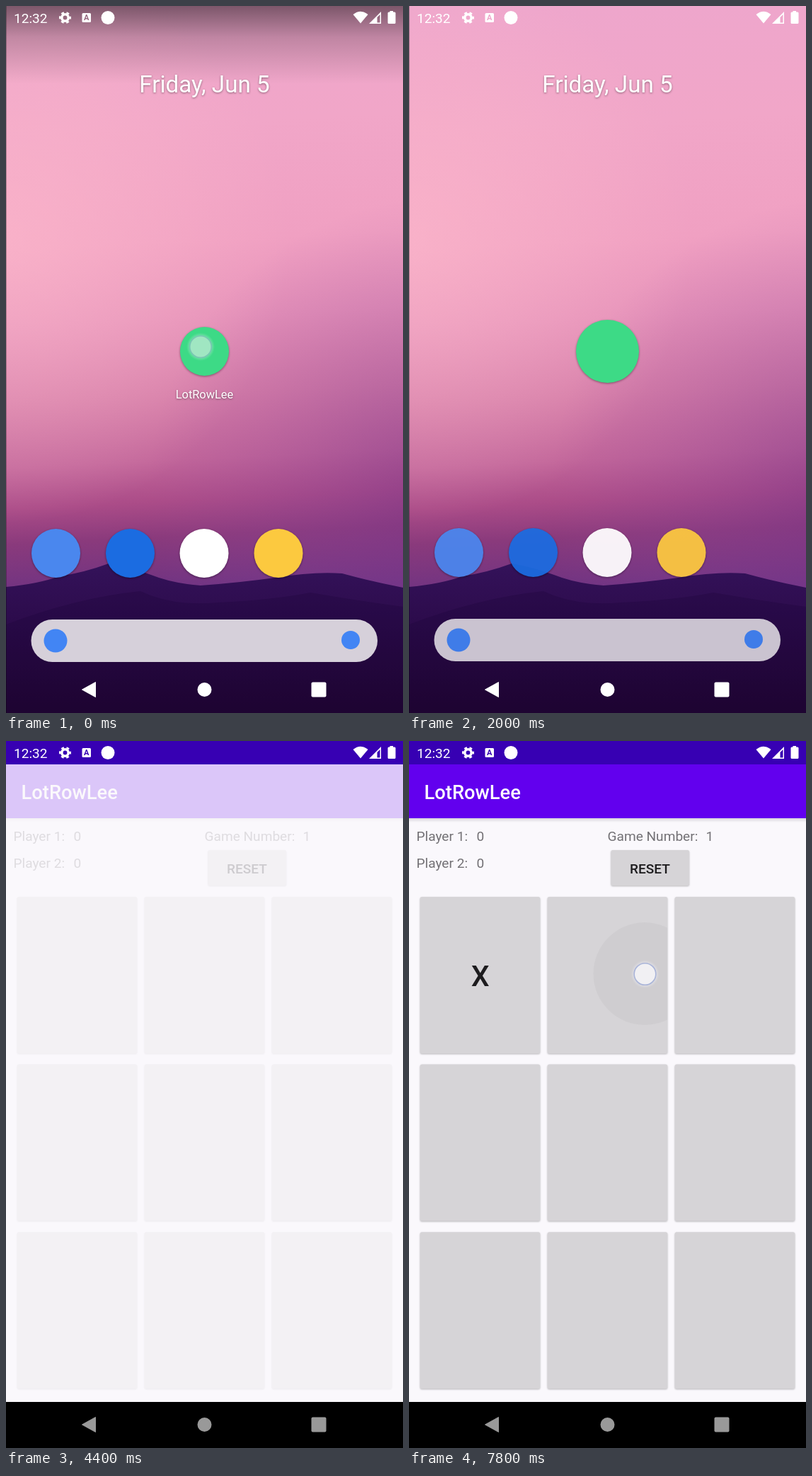
These frames come from a looping animation (561 px wide and 998 px high, 8 s). An HTML page:

```html
<!DOCTYPE html>
<html lang="en">
<head>
<meta charset="utf-8">
<title>Grid game launch</title>
<style>
  html, body { margin: 0; width: 100%; height: 100%; overflow: hidden; }
  svg { display: block; width: 561px; height: 998px; font-family: Roboto, sans-serif; font-size: 19.1px; }
  .shade { filter: drop-shadow(0 1px 1.5px #0006); }
  .cell { fill: #d6d4d7; filter: drop-shadow(0 1.2px 1.2px #0004); }
  .medium { font-weight: 500; }
</style>
</head>
<body>
<svg viewBox="0 0 561 998">
  <defs>
    <linearGradient id="sky" gradientUnits="userSpaceOnUse" x1="240" y1="0" x2="280" y2="830">
      <stop offset="0" stop-color="#eea6cc"/>
      <stop offset=".2" stop-color="#f1a6c8"/>
      <stop offset=".4" stop-color="#f0a0c2"/>
      <stop offset=".53" stop-color="#e591b9"/>
      <stop offset=".66" stop-color="#d57da8"/>
      <stop offset=".77" stop-color="#c2669a"/>
      <stop offset=".84" stop-color="#ab4c88"/>
      <stop offset=".9" stop-color="#8a3a7c"/>
      <stop offset="1" stop-color="#6b3283"/>
    </linearGradient>
    <radialGradient id="glow" gradientUnits="userSpaceOnUse" cx="0" cy="330" r="400">
      <stop offset="0" stop-color="#fcb8cb" stop-opacity=".7"/>
      <stop offset="1" stop-color="#fcb8cb" stop-opacity="0"/>
    </radialGradient>
    <radialGradient id="dusk" gradientUnits="userSpaceOnUse" cx="620" cy="690" r="420">
      <stop offset="0" stop-color="#7a3488" stop-opacity=".55"/>
      <stop offset="1" stop-color="#9c50a0" stop-opacity="0"/>
    </radialGradient>
    <linearGradient id="land" x2="0" y2="1">
      <stop offset="0" stop-color="#34125a"/>
      <stop offset=".4" stop-color="#2c0b4b"/>
      <stop offset="1" stop-color="#1f042e"/>
    </linearGradient>
    <linearGradient id="scrimFill" x2="0" y2="1">
      <stop offset="0" stop-opacity=".48"/>
      <stop offset=".4" stop-opacity=".2"/>
      <stop offset="1" stop-opacity="0"/>
    </linearGradient>
    <linearGradient id="barShadow" x2="0" y2="1">
      <stop offset="0" stop-opacity=".13"/>
      <stop offset="1" stop-opacity="0"/>
    </linearGradient>
    <radialGradient id="halo">
      <stop offset=".7" stop-color="#e9e9f2" stop-opacity=".7"/>
      <stop offset="1" stop-color="#e9e9f2" stop-opacity="0"/>
    </radialGradient>
    <clipPath id="cellClip"><rect id="clipRect" y="220" width="169.5" height="221" rx="2.5"/></clipPath>
  </defs>

  <g id="home">
    <path fill="url(#sky)" d="M0 0H561V998H0z"/>
    <path fill="url(#glow)" d="M0 0H561V830H0z"/>
    <path fill="url(#dusk)" d="M0 0H561V830H0z"/>
    <path fill="url(#land)" d="M0 820Q45 816 75 805Q110 800 145 787Q175 792 205 803Q235 815 275 818Q330 814 380 807Q435 798 475 801Q515 812 561 821V998H0z"/>
    <path fill="#1d0638" opacity=".3" d="M0 873Q100 835 190 826Q235 848 300 842Q380 838 430 828Q500 840 561 848V998H0z"/>
    <rect id="scrim" width="561" height="110" fill="url(#scrimFill)"/>
    <path fill="#0004" d="M0 0h1v998h-1z"/>
    <text class="shade" x="280.5" y="122" font-size="33.2" text-anchor="middle" fill="#fff">Friday, Jun 5</text>
    <text id="label" class="shade" x="280.5" y="554" font-size="16.4" text-anchor="middle" fill="#fff">LotRowLee</text>
    <g id="dock">
      <g class="shade">
        <circle cx="70.5" cy="772.5" r="34.5" fill="#4a87ee"/>
        <circle cx="175.5" cy="772.5" r="34.5" fill="#1b6ce1"/>
        <circle cx="280" cy="772.5" r="34.5" fill="#fff"/>
        <circle cx="385" cy="772.5" r="34.5" fill="#fcc93f"/>
      </g>
      <rect x="35.5" y="866" width="489.5" height="60" rx="30" fill="#d6d0da"/>
      <circle cx="70" cy="896" r="16.5" fill="#4285f4"/>
      <circle cx="487" cy="895" r="13" fill="#4285f4"/>
    </g>
    <circle id="icon" class="shade" cx="280.5" cy="487.5" fill="#3dda86"/>
  </g>

  <g id="app">
    <path fill="#faf8fc" d="M0 0H561V998H0z"/>
    <path fill="#3700b3" d="M0 0H561V33H0z"/>
    <path d="M0 933H561V998H0z"/>
    <g id="content">
      <path fill="#6200ee" d="M0 33H561V109H0z"/>
      <path fill="url(#barShadow)" d="M0 109H561V115H0z"/>
      <text class="medium" x="21.5" y="81.5" font-size="27.3" fill="#fff">LotRowLee</text>
      <g fill="#737175">
        <text x="10.5" y="141">Player 1:</text><text x="95.5" y="141">0</text>
        <text x="10.5" y="178.5">Player 2:</text><text x="95.5" y="178.5">0</text>
        <text x="280.5" y="141">Game Number:</text><text x="419.5" y="141">1</text>
      </g>
      <rect class="cell" x="285.5" y="154" width="110.5" height="50" rx="2.5"/>
      <text class="medium" x="340.5" y="187" text-anchor="middle" fill="#1d1c1e">RESET</text>
      <g id="board"></g>
      <circle id="ripple" clip-path="url(#cellClip)"/>
      <text id="mark" class="medium" x="100.7" y="346" font-size="41" text-anchor="middle" fill="#1d1c1e">X</text>
    </g>
  </g>

  <g fill="#fff">
    <text x="11" y="24">12:32</text>
    <circle cx="83.5" cy="16.5" r="4.7" fill="none" stroke="#fff" stroke-width="3.6"/>
    <circle cx="83.5" cy="16.5" r="7.2" fill="none" stroke="#fff" stroke-width="2.6" stroke-dasharray="3.9 3.64" stroke-dashoffset="1.95"/>
    <path fill-rule="evenodd" d="M109 10h9.500q1.500 0 1.500 1.500v10q0 1.500-1.500 1.500h-9.500q-1.500 0-1.500-1.500v-10q0-1.500 1.500-1.500zM113 12l-3 8h1.700l.5-1.500h3l.5 1.500h1.700l-3-8zM113.700 14l1 3h-2z"/>
    <circle cx="144" cy="16.500" r="9.500"/>
    <path d="M490.500 12Q501 3.500 511.500 12L501 24.500z"/>
    <path d="M513 25L530 8V25zM524.500 23.500H528.500V12L524.500 16z" fill-rule="evenodd"/>
    <path d="M542.500 7h4.500v1.500h2q1.500 0 1.500 1.500v13.500q0 1.500-1.500 1.500h-8q-1.500 0-1.500-1.500v-13.500q0-1.500 1.500-1.500h1.500z"/>
  </g>
  <g id="nav" fill="#fff">
    <path d="M107.500 965L126.500 954.500V975.500z" stroke="#fff" stroke-linejoin="round"/>
    <circle cx="280.500" cy="965" r="10"/>
    <rect x="431.500" y="954.500" width="21" height="21" rx="2"/>
  </g>
  <g id="touch">
    <circle r="20" fill="url(#halo)"/>
    <circle r="15.300" fill="#f1f0f3" stroke="#a9b4d8" stroke-width="1.600"/>
  </g>
</svg>
<script>
const LOOP = 8000, STEP = 200;
const el = id => document.getElementById(id);
const set = (id, attrs) => {
  for (const key in attrs) el(id).setAttribute(key, attrs[key]);
};

el('board').innerHTML = Array.from({ length: 9 }, (_, i) =>
  `<rect class="cell" x="${15.7 + i % 3 * 180}" y="${220 + Math.floor(i / 3) * 236.6}" width="169.5" height="221" rx="2.5"/>`).join('');
const firstCell = el('board').firstElementChild;

// Piecewise linear value from [time, value] pairs
function track(t, ...keys) {
  const next = keys.findIndex(key => key[0] > t);
  if (next === 0) return keys[0][1];
  if (next < 0) return keys.at(-1)[1];
  const [t0, v0] = keys[next - 1], [t1, v1] = keys[next];
  return v0 + (v1 - v0) * (t - t0) / (t1 - t0);
}

function drawHome(t) {
  const leaving = track(t, [1400, 0], [2000, 1]);
  set('icon', { r: track(t, [800, 34.5], [1400, 38], [2000, 44.5]) });
  set('label', { opacity: 1 - leaving });
  set('scrim', { opacity: 1 - leaving });
  set('dock', { opacity: 1 - .06 * leaving, transform: `translate(0 ${-leaving})` });
}

function drawApp(t) {
  const second = t >= 7400;
  set('content', { opacity: track(t, [4200, 0], [4400, .2], [4600, .7], [4800, 1]) });
  set('mark', { opacity: t >= 6800 ? 1 : 0 });
  set('clipRect', { x: second ? 195.7 : 15.7 });
  set('ripple', second
    ? { cx: 333, cy: 328.5, r: 72.5, opacity: .03 }
    : { cx: 92, cy: 352, r: track(t, [6400, 0], [6600, 110], [6800, 170]),
        opacity: track(t, [6400, 0], [6600, .04], [6800, .025], [7000, 0]) });
  firstCell.style.filter = t === 6600 || t === 6800 ? 'drop-shadow(0 2px 2px #0005)' : '';
}

function drawTouch(t) {
  const [x, y] = t < 2200 ? [275, 481] : t < 7300 ? [86, 372] : [333.5, 329];
  const opacity = t < 2200
    ? track(t, [0, .55], [200, .6], [400, .3], [600, 0])
    : t < 6400 ? 0
    : track(t, [6600, 1], [6800, .6], [7000, .2], [7200, 0], [7400, .9], [7800, 1]);
  set('touch', { transform: `translate(${x} ${y})`, opacity });
}

function draw(now) {
  const t = Math.floor(now % LOOP / STEP) * STEP;
  const running = t >= 2200;
  set('home', { display: running ? 'none' : 'inline' });
  set('app', { display: running ? 'inline' : 'none' });
  set('nav', { opacity: track(t, [2400, 1], [3000, .78], [3600, .63], [4000, .6]) });
  drawHome(t);
  drawApp(t);
  drawTouch(t);
  requestAnimationFrame(draw);
}

const start = performance.now();
requestAnimationFrame(function tick() {
  draw(performance.now() - start);
});
</script>
</body>
</html>
```
